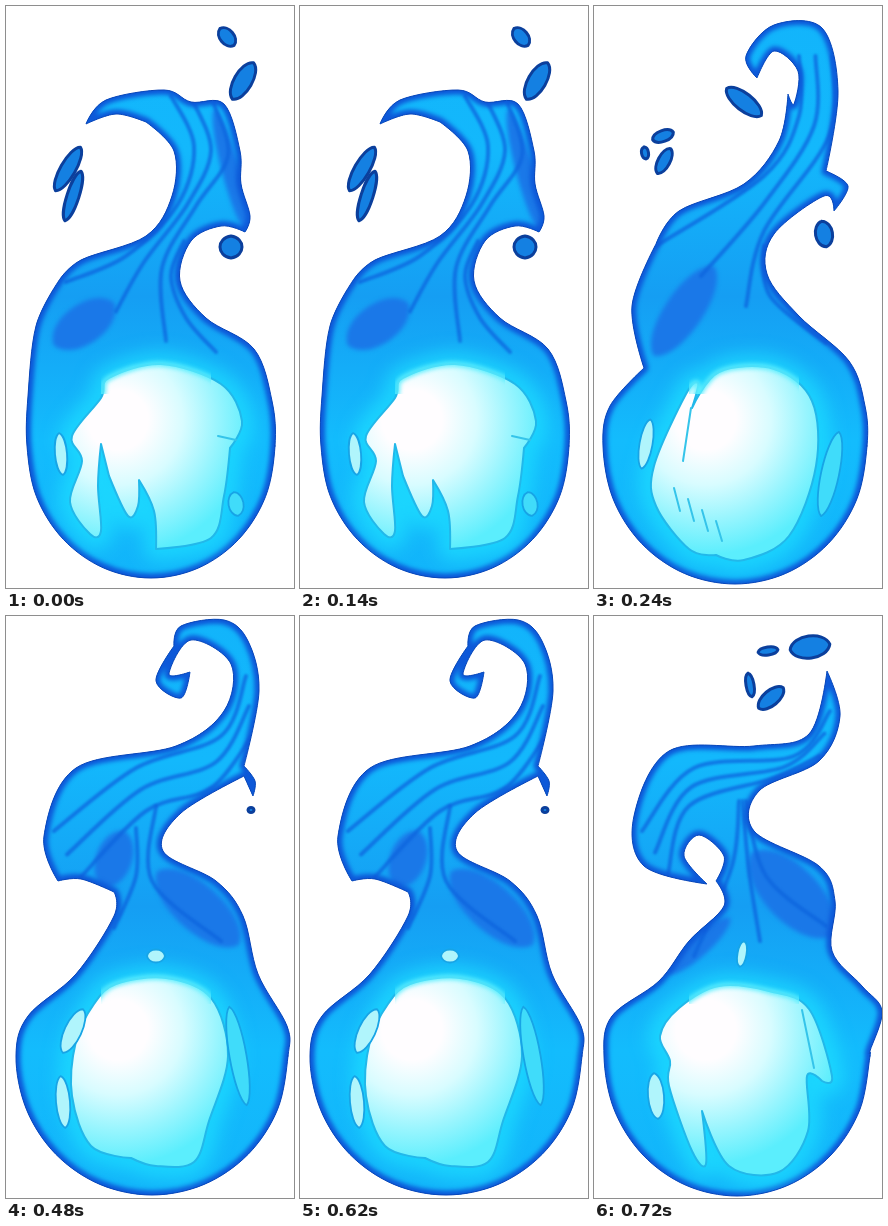
Recreate the animation shown at these times as an HTML page with a canvas. Size 288 by 582 pixels, loop 920 ms.

```html
<!DOCTYPE html>
<html lang="en">
<head>
<meta charset="utf-8">
<title>Blue flame</title>
<style>
html, body { margin: 0; width: 100%; height: 100%; overflow: hidden; background: #fff; }
canvas { display: block; width: 288px; height: 582px; }
</style>
</head>
<body>
<canvas id="stage" width="288" height="582"></canvas>
<script>
// tail and core: smooth curves through key points, "!" marks a sharp corner.
// bulb: [centre x, radius x, radius y] of the round lower half.
// strands, marks: [first guide, last guide, count], evenly blended.
// drops, shades, bits: leaves [x, y, length, width, degrees].
const poses = [
  {
    end: 240,
    bulb: [145, 124, 132],
    tail: `22,390 30,320 52,276! 75,254 140,230 166,190 168,145 140,116! 110,108 80,118! 100,94 158,84
      185,96 218,98 234,145 235,178 244,210 239,226! 215,220 185,235 174,275 200,312 248,343 266,395`,
    core: `66,430 95,392 103,372 155,358 215,378 236,415 224,442! 218,490 205,532 150,543! 148,505 133,474!
      132,500 122,510 103,470! 95,438! 92,480 95,525 84,528 64,496 76,455`,
    strands: [
      ['165,90 188,140 172,198 120,250 60,276', '208,98 222,150 190,200 156,262 160,335', 3],
      ['178,235 165,270 180,312 210,346', '', 1]
    ],
    marks: [['212,430 230,434', '', 1]],
    drops: [[221, 31, 22, 14, 50], [237, 75, 42, 18, -60], [62, 163, 50, 15, -60], [67, 190, 52, 12, -72], [225, 241, 22, 22, 90]],
    shades: [[78, 318, 74, 40, -35], [225, 165, 130, 18, 75]],
    bits: [[55, 448, 42, 12, 85], [230, 498, 24, 15, 80]]
  },
  {
    end: 480,
    bulb: [141, 132, 138],
    tail: `16,400 50,362! 38,300 62,238! 85,205 150,178 185,135 194,88! 200,98 204,65 180,45 163,72! 152,50
      180,19 228,22 244,85 232,165! 254,180 240,205! 230,190 180,228 173,268 205,310 255,355 271,400`,
    core: `60,460 92,388 104,378 98,402! 125,366 180,363 218,395 222,460 195,530 150,554 122,549! 95,543 62,500`,
    strands: [
      ['205,50 205,110 170,170 62,240', '238,50 235,130 170,225 152,300', 3],
      ['170,240 176,290 232,337', '', 1]
    ],
    marks: [['80,482 86,505', '122,515 128,535', 4], ['97,402 89,455', '', 1]],
    drops: [[150, 96, 44, 17, 38], [69, 130, 22, 11, -20], [70, 155, 28, 12, -62], [51, 147, 12, 7, 80], [230, 228, 26, 17, 80]],
    shades: [[90, 305, 108, 38, -56]],
    bits: [[52, 438, 50, 13, -80], [236, 468, 86, 18, -78]]
  },
  {
    end: 720,
    bulb: [146, 136, 139],
    tail: `22,400 70,358 108,300 108,276! 75,263 52,265! 38,220 70,152 170,130 218,95 225,48 185,24 163,58
      184,56! 175,82 150,65 168,30! 175,10 218,4 242,25 253,75 238,150! 249,165 247,180! 238,160! 175,197
      157,235 210,265 237,300 252,358 281,410`,
    core: `70,425 88,388 110,368 160,362 205,382 222,440 203,505 188,546 150,550 125,542! 85,530 66,480`,
    strands: [
      ['240,60 215,120 130,152 48,215', '246,120 205,172 140,195 74,262', 3],
      ['130,212 130,260 108,312', '150,190 146,265 215,325', 2]
    ],
    marks: [],
    drops: [[245, 194, 6, 5, 0]],
    shades: [[108, 243, 60, 36, -70], [192, 292, 110, 46, 42]],
    bits: [[67, 415, 48, 17, -65], [57, 486, 52, 14, 85], [232, 440, 100, 17, 80], [150, 340, 18, 13, 0]]
  },
  {
    end: 920,
    bulb: [143, 133, 140],
    tail: `18,400 65,365 95,325 130,290 122,265! 130,240 105,219 90,240 113,268! 50,250 40,200 75,135 160,130
      215,118 233,55! 246,100 225,145 165,175 160,215 225,250 241,285 238,335 268,370 288,395 276,435`,
    core: `66,420 85,392 125,370 175,375 215,393 238,460 228,465! 213,460 214,515 185,556 135,550 108,495!
      112,548 98,535 75,470 76,445`,
    strands: [
      ['236,95 200,140 100,152 48,215', '225,140 180,162 95,190 74,258', 3],
      ['145,185 138,250 100,340', '152,185 172,260 232,310', 3]
    ],
    marks: [['208,394 220,452', '', 1]],
    drops: [[216, 31, 40, 22, -8], [174, 35, 20, 8, -8], [156, 69, 24, 8, 80], [177, 82, 32, 15, -40]],
    shades: [[198, 278, 116, 54, 46], [105, 330, 84, 20, -42]],
    bits: [[62, 480, 46, 16, 85], [148, 338, 26, 9, -80]]
  }
];

const ctx = document.getElementById('stage').getContext('2d');
ctx.lineCap = ctx.lineJoin = 'round';
const bulbY = 440;

function points(text) {
  return text.trim().split(/\s+/).map(s => {
    const [x, y] = s.split(',').map(parseFloat);
    return { x, y, pull: s.endsWith('!') ? 0 : 1 / 6 };
  });
}

function curve(pts, closed) {
  const n = pts.length;
  const at = i => pts[closed ? (i + n) % n : Math.max(0, Math.min(n - 1, i))];
  const handle = (i, dir) => {
    const p = at(i), a = at(i - 1), b = at(i + 1), k = p.pull * dir;
    return [p.x + (b.x - a.x) * k, p.y + (b.y - a.y) * k];
  };
  const path = new Path2D();
  path.moveTo(pts[0].x, pts[0].y);
  for (let i = 0; i < (closed ? n : n - 1); i++) {
    const end = at(i + 1);
    path.bezierCurveTo(...handle(i, 1), ...handle(i + 1, -1), end.x, end.y);
  }
  if (closed) path.closePath();
  return path;
}

function bodyPath({ bulb: [cx, rx, ry], tail }) {
  const arc = Array.from({ length: 9 }, (_, i) => {
    const a = i * Math.PI / 8;
    return { x: cx + rx * Math.cos(a), y: bulbY + ry * Math.sin(a), pull: 1 / 6 };
  });
  return curve([...arc, ...points(tail)], true);
}

function strandPaths([first, last, count]) {
  const a = points(first), b = points(last || first);
  return Array.from({ length: count }, (_, i) => {
    const k = count > 1 ? i / (count - 1) : 0;
    return curve(a.map((p, j) => ({
      x: p.x + (b[j].x - p.x) * k,
      y: p.y + (b[j].y - p.y) * k,
      pull: p.pull
    })));
  });
}

function leaf([x, y, length, width, degrees]) {
  const l = length / 2, w = width * 2 / 3, path = new Path2D(), turned = new Path2D();
  path.moveTo(-l, 0);
  path.bezierCurveTo(-l * 0.8, -w, l * 0.8, -w, l, 0);
  path.bezierCurveTo(l * 0.8, w, -l * 0.8, w, -l, 0);
  turned.addPath(path, new DOMMatrix().translate(x, y).rotate(degrees));
  return turned;
}

function gradient(g, ...colors) {
  colors.forEach((c, i) => g.addColorStop(i / (colors.length - 1), c));
  return g;
}
const bodyFill = gradient(ctx.createLinearGradient(0, 0, 0, 580), '#12b4fb', '#13b8fc', '#159ef3', '#13bcfd', '#12b4fa');
const coreFill = gradient(ctx.createRadialGradient(112, 414, 30, 112, 414, 135), '#fffdff', '#d8fcff', '#98f5fe', '#5beefd');

function fill(path, color) {
  ctx.fillStyle = color;
  ctx.fill(path);
}

function stroke(path, color, width) {
  ctx.strokeStyle = color;
  ctx.lineWidth = width;
  ctx.stroke(path);
}

function blurred(radius, paint) {
  ctx.filter = `blur(${radius}px)`;
  paint();
  ctx.filter = 'none';
}

function clipped(path, paint) {
  ctx.save();
  ctx.clip(path);
  paint();
  ctx.restore();
}

function draw(pose) {
  const body = bodyPath(pose), core = curve(points(pose.core), true);
  ctx.clearRect(0, 0, 288, 582);

  for (const drop of pose.drops.map(leaf)) {
    fill(drop, '#1480e2');
    stroke(drop, '#0b3f9c', 3);
  }

  fill(body, bodyFill);
  clipped(body, () => {
    blurred(2, () => pose.shades.forEach(s => fill(leaf(s), '#1a78e8')));
    blurred(1.2, () => pose.strands.flatMap(strandPaths).forEach(p => stroke(p, '#0e66dec0', 4)));
    blurred(2.2, () => stroke(body, '#0d58d8', 9));
    blurred(9, () => stroke(core, '#1fe2ffb0', 24));
  });
  stroke(body, '#0a45b8', 1);

  fill(core, coreFill);
  stroke(core, '#22b8ea', 2);
  // The upper rim of the core melts into the glow.
  const rim = new Path2D();
  rim.rect(95, 340, 110, 48);
  clipped(rim, () => blurred(2, () => stroke(core, '#5ceefe', 5)));

  for (const b of pose.bits) {
    const bit = leaf(b);
    fill(bit, b[0] < 200 ? '#b0f5fc' : '#40dcfa');
    stroke(bit, '#17a4e6', 1.8);
  }
  pose.marks.flatMap(strandPaths).forEach(p => stroke(p, '#35c4ea', 2));
}

let shown;
function tick() {
  const t = performance.now() % 920;
  const pose = poses.find(p => t < p.end);
  if (pose !== shown) draw(shown = pose);
  requestAnimationFrame(tick);
}
tick();
</script>
</body>
</html>
```
